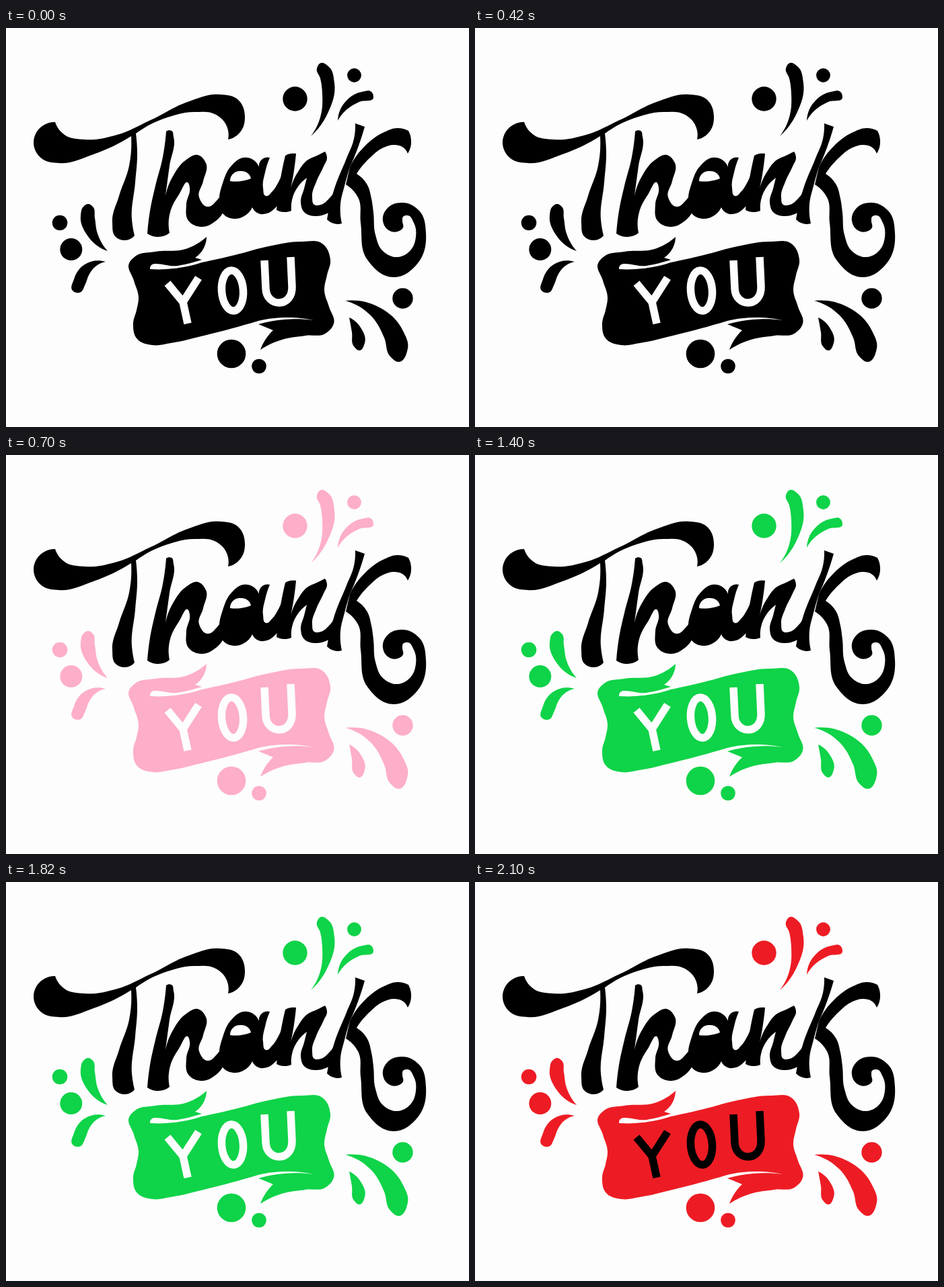
An HTML page for the animation above (2.8 s loop, 688 px wide and 594 px high).

```html
<!DOCTYPE html>
<html lang="en">
<head>
<meta charset="utf-8">
<title>Thank you</title>
<style>
  html, body { margin: 0; width: 100%; height: 100%; overflow: hidden; background: #fdfdfd; }
  svg { display: block; width: 688px; height: 594px; }
  .accent { animation: accent 2.8s step-end infinite; }
  .hole { fill: #fdfdfd; }
  .you {
    fill: none; stroke-width: 11.5; stroke-linejoin: round;
    animation: you 2.8s step-end infinite;
  }
  @keyframes accent {
    0% { fill: #000; }
    25% { fill: #fdaec9; }
    50% { fill: #0fd348; }
    75%, 100% { fill: #ed1c24; }
  }
  @keyframes you {
    0% { stroke: #fdfdfd; }
    75%, 100% { stroke: #000; }
  }
</style>
</head>
<body>
<svg viewBox="0 0 688 594" role="img" aria-label="Thank you">
  <g class="accent">
    <circle cx="429.5" cy="105.5" r="18.2"/>
    <circle cx="517.5" cy="70.5" r="10.4"/>
    <circle cx="80" cy="290" r="11.3"/>
    <circle cx="96.8" cy="329.6" r="16.5"/>
    <circle cx="589.5" cy="402.5" r="15.2"/>
    <circle cx="335" cy="485" r="21.3"/>
    <circle cx="376" cy="503.5" r="10.8"/>

    <g id="drops">
      <path data-outline="453 161 / 467 133 470 98 467 75 462 60 468 52 479 57 488 82 478 127"/>
      <path data-outline="493 138 / 506 108 529 95 543 95 546 103 525 110 508 120"/>
      <path data-outline="151 332 / 121 309 111 279 115 266 122 262 129 266 132 283 136 306"/>
      <path data-outline="148 348 / 133 355 123 368 118 381 109 394 99 391 101 374 117 352"/>
      <path data-outline="504 406 / 553 415 590 451 597 477 583 497 571 489 562 461 541 427"/>
      <path data-outline="510 431 / 527 446 533 469 525 480 517 474 514 453"/>
    </g>

    <path id="ribbon" data-outline="214 359 / 250 358 291 349 / 340 338 390 325 440 318 470 321 482 345
      477 368 473 390 480 415 487 440 476 454 445 458 410 464 378 479 / 386 463 397 450 / 375 441 /
      414 434 457 435 / 418 431 375 436 / 294 458 245 469 217 472 195 463 189 440 194 420 197 402
      190 376 183 350 192 340 222 333 270 328 298 311 / 295 325 281 342 / 291 345 / 255 354 214 358"/>
  </g>

  <g class="you">
    <path d="M240 380L263 408L286 372M263 408L270 440"/>
    <ellipse cx="336.5" cy="391" rx="16" ry="30" transform="rotate(-4 336.5 391)"/>
    <path d="M384 346L386 388C387 416 426 417 425 385L423 341"/>
  </g>

  <g id="thank">
    <path id="T" data-outline="73 140 / 57 144 41 171 54 195 78 201 130 188 186 161 /
      183 205 168 250 158 290 163 311 177 316 191 309 / 187 285 192 230 195 185 193 157 /
      240 133 280 125 312 129 327 144 330 166 / 348 155 355 133 344 106 318 99 270 110
      215 137 165 159 117 166 87 159"/>
    <path id="h" data-outline="238 154 / 246 153 249 162 243 205 237 250 / 249 219 268 196 285 189
      297 201 293 228 287 252 300 266 313 257 322 242 / 324 272 / 312 287 290 296 272 288 268 262
      273 238 271 231 257 248 243 278 243 305 / 226 311 210 306 / 214 272 222 235 233 192"/>
    <path id="a" data-outline="376 207 / 381 195 392 193 / 385 215 382 238 386 250 396 243 404 231
      410 218 / 410 253 / 400 268 388 276 375 276 366 267 / 354 280 339 284 322 276 317 258
      322 231 335 205 353 193 367 196"/>
    <path class="hole" data-outline="333 228 / 340 215 350 213 359 216 364 224 / 349 228"/>
    <path id="n" data-outline="415 190 / 423 187 431 187 / 428 212 423 239 / 434 214 449 196 462 190
      474 184 / 477 193 472 206 461 229 455 252 458 263 468 263 480 254 491 236 / 488 269 /
      475 277 461 280 443 274 438 259 443 239 447 223 / 434 236 425 256 424 272 /
      413 274 402 271 / 407 230"/>
    <path id="K-stem" data-outline="519 142 / 533 147 / 523 178 511 207 / 503 235 497 262 499 291 /
      487 291 477 285 / 488 239 506 194 517 165"/>
    <path id="K-leg" data-outline="511 207 / 534 175 562 155 582 149 598 153 / 602 167 597 187 /
      589 177 577 174 561 178 541 193 521 217 / 536 232 543 254 546 275 549 308 560 332 582 341
      601 331 609 311 606 290 597 279 590 281 589 287 590 297 582 303 567 300 560 287 567 268
      588 260 614 272 624 305 612 350 577 371 537 345 527 290 523 252 505 233 /"/>
  </g>
</svg>
<script>
  const sub = (a, b) => [a[0] - b[0], a[1] - b[1]];
  const move = (p, d, k) => [p[0] + d[0] * k, p[1] + d[1] * k];
  const unit = v => { const l = Math.hypot(...v) || 1; return [v[0] / l, v[1] / l]; };

  // Direction of the circle through three neighbouring points.
  function tangent(a, b, c) {
    const d = sub(b, a), e = sub(c, b);
    const m = d[0] ** 2 + d[1] ** 2, n = e[0] ** 2 + e[1] ** 2;
    return unit([d[0] / m + e[0] / n, d[1] / m + e[1] / n]);
  }

  // Mirrors a tangent across a chord, so an end segment bends like an arc.
  function mirror(t, chord) {
    const u = unit(chord), k = 2 * (t[0] * u[0] + t[1] * u[1]);
    return [u[0] * k - t[0], u[1] * k - t[1]];
  }

  function curve(pts) {
    const last = pts.length - 1;
    if (last < 2) return "L" + pts[last];
    const t = pts.map((p, i) => i && i < last ? tangent(pts[i - 1], p, pts[i + 1]) : null);
    t[0] = mirror(t[1], sub(pts[1], pts[0]));
    t[last] = mirror(t[last - 1], sub(pts[last], pts[last - 1]));
    return pts.slice(1).map((p, i) => {
      const k = Math.hypot(...sub(p, pts[i])) * 0.36;
      return "C" + [move(pts[i], t[i], k), move(p, t[i + 1], -k), p].join(" ");
    }).join("");
  }

  // Smooth runs of points; a slash marks a corner shared by two runs.
  function outline(text) {
    const runs = text.split("/").map(run => {
      const n = run.match(/\d+/g) || [];
      return n.flatMap((x, i) => i % 2 ? [] : [[+x, +n[i + 1]]]);
    });
    const start = runs[0][0];
    runs[runs.length - 1].push(start);
    let from = start, d = "M" + start;
    for (const run of runs.slice(1)) {
      d += curve([from, ...run]);
      from = run[run.length - 1];
    }
    return d + "Z";
  }

  for (const path of document.querySelectorAll("[data-outline]"))
    path.setAttribute("d", outline(path.dataset.outline));
</script>
</body>
</html>
```
